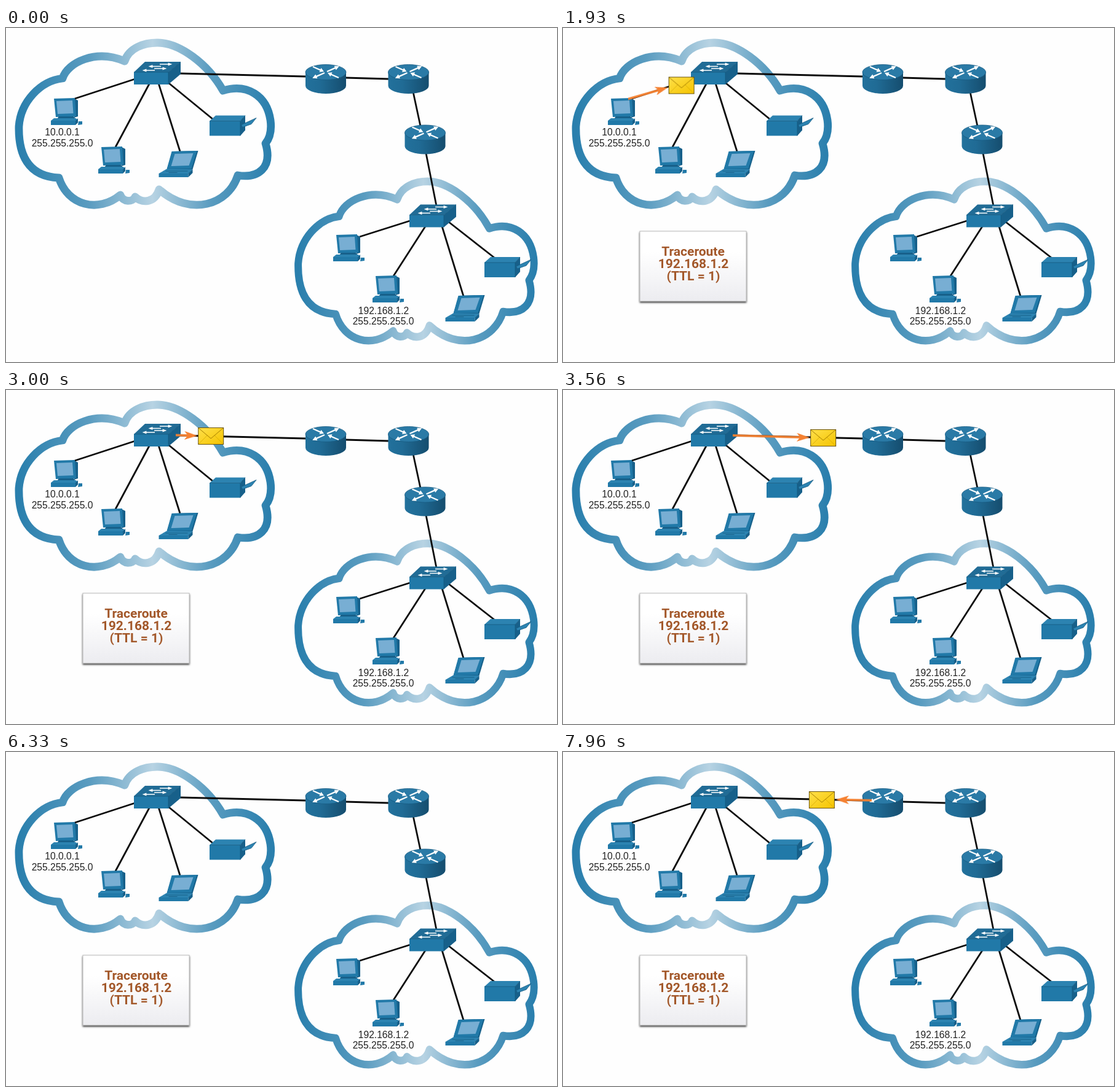
An HTML page that plays this animation: 896x544 px, repeating every 8 s.

```html
<!DOCTYPE html>
<html lang="en">
<head>
<meta charset="utf-8">
<title>Traceroute, TTL 1</title>
<style>
html, body { margin: 0; width: 100%; height: 100%; overflow: hidden; background: #fefefe; }
svg { display: block; width: 100%; height: 100%; }

.wire { stroke: #0c0c0c; stroke-width: 2.8; fill: none; }
.front { fill: #2179a8; }
.top { fill: #2c83b1; }
.deck { fill: #216c96; }
.side { fill: #17608a; }
.glass { fill: #78aed3; }
.edge { stroke: #14597f; stroke-width: .8; fill: none; }
.sign { fill: #fff; }

.host { font: 15.6px "Liberation Sans", Arial, sans-serif; fill: #222; text-anchor: middle; }
.title { font: 700 21px Roboto, sans-serif; fill: #a3582a; text-anchor: middle; }
.note { font: 16px "Open Sans", sans-serif; fill: #1c1c1c; text-anchor: middle; }

.card, .icmp, .ask, .forward, .reply { animation: 8s linear infinite both; }
.card { animation-name: card; }
.icmp { animation-name: icmp; }
.ask { animation-name: ask; }
.forward { animation-name: forward; }
.reply { animation-name: reply; }

@keyframes card {
  0%, 5.3% { opacity: 0; }
  11.6%, 100% { opacity: 1; }
}
@keyframes icmp {
  0%, 49.5% { opacity: 0; }
  55.7%, 79.1% { opacity: 1; }
  79.12%, 100% { opacity: 0; }
}
@keyframes ask {
  0%, 5.3% { opacity: 0; transform: translate(96px, 121px); }
  11.6% { opacity: 1; }
  12.5% { transform: translate(96px, 121px); }
  30.5% { opacity: 1; transform: translate(245.4px, 78.4px); }
  30.51%, 100% { opacity: 0; transform: translate(245.4px, 78.4px); }
}
@keyframes forward {
  0%, 30.5% { opacity: 0; transform: translate(243px, 72px); }
  30.51% { opacity: 1; }
  50% { opacity: 1; transform: translate(493.7px, 80.3px); }
  53.75%, 100% { opacity: 0; transform: translate(493.7px, 80.3px); }
}
@keyframes reply {
  0%, 86.2% { opacity: 0; transform: translate(504.6px, 79px); }
  92.5% { opacity: 1; }
  93% { transform: translate(504.6px, 79px); }
  100% { opacity: 1; transform: translate(414.6px, 77.9px); }
}
</style>
</head>
<body>
<svg viewBox="0 0 896 544">
<defs>
  <linearGradient id="mist">
    <stop offset="0" stop-color="#2a7fad"/>
    <stop offset=".28" stop-color="#5a9cc0"/>
    <stop offset=".53" stop-color="#b7d3e3"/>
    <stop offset=".76" stop-color="#5a9cc0"/>
    <stop offset="1" stop-color="#2a7fad"/>
  </linearGradient>
  <linearGradient id="drum">
    <stop offset="0" stop-color="#22719c"/>
    <stop offset=".35" stop-color="#206b95"/>
    <stop offset="1" stop-color="#154d6e"/>
  </linearGradient>
  <linearGradient id="paper" x2="0" y2="1">
    <stop offset=".3" stop-color="#fff"/>
    <stop offset="1" stop-color="#ececf0"/>
  </linearGradient>
  <linearGradient id="gold" x2="1" y2="1">
    <stop offset="0" stop-color="#ffe04a"/>
    <stop offset="1" stop-color="#f5c400"/>
  </linearGradient>
  <filter id="shade" x="-10%" y="-10%" width="120%" height="125%">
    <feDropShadow dx="0" dy="2" stdDeviation="1.5" flood-color="#000" flood-opacity=".8"/>
  </filter>

  <path id="cloud" fill="none" stroke="url(#mist)" stroke-width="12.800" stroke-linejoin="round"
    d="M92 82C100 56 146 34 193 54C200 32 225 24 246 24C282 24 328 58 353 102
       C392 90 424 110 430 150C432 165 430 178 422 188C434 228 410 245 377 240C362 288 300 308 249 263
       C242 285 222 286 210 275C206 284 190 284 186 272C150 302 100 289 86 244C35 242 20 205 21 160
       C24 120 56 86 92 82Z"/>

  <path id="dart" class="sign" d="M0-.9H16V-3L24 0L16 3V.9H0Z"/>

  <g id="switch">
    <path class="deck" d="M0 17L18 0H76L56 17Z"/>
    <path class="side" d="M56 17L76 0V20L56 37Z"/>
    <path class="front" d="M0 17H56V37H0Z"/>
    <path class="edge" d="M0 17H56L76 0M56 17V37"/>
    <use href="#dart" transform="translate(42 4) scale(.85)"/>
    <use href="#dart" transform="translate(44 7.500) scale(-.85 .85)"/>
    <use href="#dart" transform="translate(33 11) scale(.85)"/>
    <use href="#dart" transform="translate(34 14) scale(-.85 .85)"/>
  </g>

  <g id="router">
    <path fill="url(#drum)" d="M-33 0V22A33 13 0 0 0 33 22V0Z"/>
    <ellipse rx="33" ry="12.500" fill="#2a7aa6" stroke="#175b82" stroke-width=".8"/>
    <use href="#dart" transform="translate(2 -1) rotate(-24) scale(.9 1.250)"/>
    <use href="#dart" transform="translate(-2 1) rotate(156) scale(.9 1.250)"/>
    <use href="#dart" transform="translate(-21 -9) rotate(24) scale(.82 1.250)"/>
    <use href="#dart" transform="translate(21 9) rotate(204) scale(.82 1.250)"/>
  </g>

  <g id="pc">
    <path class="side" d="M38 1L44 4V30L38 32Z"/>
    <path class="front" d="M5 1L39 0L41 30L8 31Z"/>
    <path class="glass" d="M9 5L35 4L36.500 25L11 26Z"/>
    <path class="side" d="M13 30H37L40 34H10Z"/>
    <path class="top" d="M5 33H41L44 37H0Z"/>
    <path class="front" d="M0 37H40V44H0Z"/>
    <path class="side" d="M40 37L44 33V40L40 44Z"/>
    <path class="front" d="M45 38H51V43L44 44Z"/>
  </g>

  <g id="laptop">
    <path class="side" d="M22 1L64 0L55 30L13 30Z"/>
    <path class="front" d="M21 1L62 0L53 29L13 30Z"/>
    <path class="glass" d="M26 5L56 4L49 24L20 25Z"/>
    <path class="top" d="M12 30H55L49 37H0Z"/>
    <path class="front" d="M0 37H48V43H0Z"/>
    <path class="side" d="M48 37L55 30V36L48 43Z"/>
    <path class="edge" d="M11 33H47M16 35.500H30"/>
  </g>

  <g id="printer">
    <path class="top" d="M0 9L10 0H58L50 9Z"/>
    <path class="side" d="M50 9L58 0V24L50 33Z"/>
    <path class="front" d="M0 9H50V33H0Z"/>
    <path class="top" d="M52 15L76 4L68 14L54 19Z"/>
    <path class="edge" d="M0 9H50L58 0M50 9V33M52 15L76 4L68 14L54 19"/>
  </g>

  <g id="mail">
    <rect x="-20.500" y="-13.500" width="41" height="27" fill="url(#gold)" stroke="#6b5510"/>
    <path d="M-20-13L0 4L20-13" fill="none" stroke="#a47d00"/>
    <path d="M-20 13L-6-1M20 13L6-1" stroke="#d3a500" stroke-width=".7"/>
  </g>

  <path id="arrow" fill="#f58131" d="M0 0L-21-7L-17-1.800H-320V1.800H-17L-21 7Z"/>

  <clipPath id="past-pc"><rect x="106" width="500" height="300"/></clipPath>
  <clipPath id="past-switch"><rect x="276" width="400" height="300"/></clipPath>
  <clipPath id="past-router"><rect width="502" height="300"/></clipPath>
</defs>

<rect width="896" height="544" fill="#fefefe"/>
<use href="#cloud"/>
<use href="#cloud" transform="translate(455.500 226.300) scale(.936 .982)"/>

<path class="wire" d="M109 116L210 83M178 194L233 91M283 201L248 90M337 149L265 90
  M283 74L488 79M552 81L622 83M662 104L674 160M683 204L700 290
  M575 340L657 314M630 404L682 323M744 437L709 323M794 374L720 316"/>

<use href="#switch" x="208" y="55"/>
<use href="#switch" x="656" y="287.500"/>
<use href="#router" x="520" y="72"/>
<use href="#router" x="654.500" y="72"/>
<use href="#router" x="681.500" y="170.500"/>
<use href="#pc" x="73" y="114"/>
<use href="#pc" x="150" y="193"/>
<use href="#pc" x="532" y="336"/>
<use href="#pc" x="596" y="403"/>
<use href="#laptop" x="248.500" y="200"/>
<use href="#laptop" x="714.500" y="435"/>
<use href="#printer" x="331" y="142.500"/>
<use href="#printer" x="778" y="373"/>

<text class="host" x="91.500" y="175">10.0.0.1</text>
<text class="host" x="91.500" y="192.500">255.255.255.0</text>
<text class="host" x="614" y="466">192.168.1.2</text>
<text class="host" x="613.500" y="483">255.255.255.0</text>

<g class="card">
  <rect x="125" y="331" width="173" height="114" fill="url(#paper)" stroke="#aaa" stroke-width=".8" filter="url(#shade)"/>
  <text class="title" x="211.500" y="371">Traceroute</text>
  <text class="title" x="212" y="391">192.168.1.2</text>
  <text class="title" x="212" y="411">(TTL = 1)</text>
</g>

<g class="icmp">
  <rect x="439" y="122" width="207" height="73" rx="4" fill="#fee6d6" stroke="#f47c2c" stroke-width="2.200"/>
  <text class="note" x="542.500" y="148">ICMP</text>
  <text class="note" x="542" y="176">Time Exceeded</text>
</g>

<!-- Each arrow trails its envelope and is cut off where the hop begins. -->
<g clip-path="url(#past-pc)">
  <g class="ask"><use href="#arrow" transform="translate(-22 3.500) rotate(-16)"/></g>
</g>
<g class="ask"><use href="#mail"/></g>

<g clip-path="url(#past-switch)">
  <g class="forward"><use href="#arrow" transform="translate(-22 -.500) rotate(1.600)"/></g>
</g>
<g class="forward"><use href="#mail"/></g>

<g clip-path="url(#past-router)">
  <g class="reply"><use href="#arrow" transform="translate(23 -.500) rotate(181.300)"/></g>
</g>
<g class="reply"><use href="#mail"/></g>
</svg>
</body>
</html>
```
